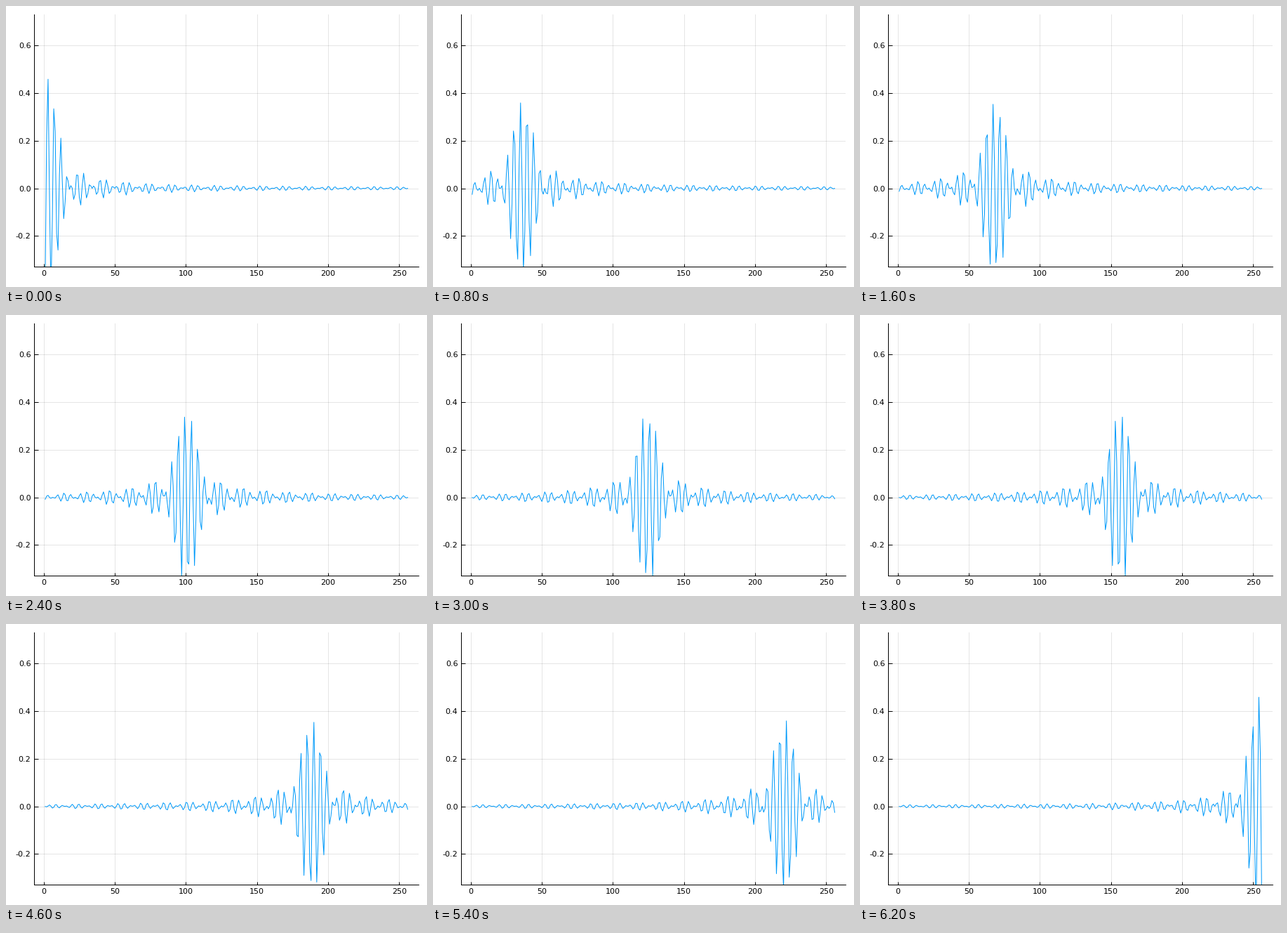
Recreate the animation shown at these times as a matplotlib script. Size 600 by 400 pixels, loop 6.4 s.

```python
import numpy as np
import matplotlib.pyplot as plt
from matplotlib.animation import FuncAnimation

W, H, DPI = 600, 400, 100
PX = 72 / DPI  # one pixel in points
N, BAND, FIRST = 256, 32, 96
STEP_MS = 200

plt.rcParams["font.family"] = "DejaVu Sans"


def polar(matrix):
    """Nearest orthogonal matrix."""
    u, _, vt = np.linalg.svd(matrix)
    return u @ vt


def wave_packets():
    """Varimax rotation of one band of DCT-II vectors: one packet per column."""
    k = FIRST + np.arange(BAND)
    basis = np.sqrt(2 / N) * np.cos(np.pi * np.outer(np.arange(N) + 0.5, k) / N)

    # Start from packets centred every N / BAND samples
    half = np.arange(BAND) + 0.5
    phase = np.pi * np.outer(half, half) / BAND
    rotation = polar(np.cos(phase) + np.sin(phase))
    for _ in range(300):
        packets = basis @ rotation
        rotation = polar(basis.T @ (N * packets**3 - packets))

    packets = basis @ rotation
    flip = packets.max(axis=0) < -packets.min(axis=0)
    return np.where(flip, -packets, packets)


packets = wave_packets()
x = np.arange(1, N + 1)

fig = plt.figure(figsize=(W / DPI, H / DPI), dpi=DPI, facecolor="white")
left, right, top, bottom = 40.4, 588, 12, 371.4
ax = fig.add_axes([left / W, 1 - bottom / H, (right - left) / W, (bottom - top) / H])
margin = 0.03 * (N - 1)
ax.set_xlim(1 - margin, N + margin)
ax.set_ylim(-0.33, 0.73)

x_ticks = np.arange(0, 251, 50)
y_ticks = [-0.2, 0.0, 0.2, 0.4, 0.6]
ax.set_xticks(x_ticks, [str(t) for t in x_ticks])
ax.set_yticks(y_ticks, [f"{t:.1f}" for t in y_ticks])
ax.tick_params(direction="in", width=PX, labelsize=8)
ax.tick_params(axis="x", length=4 * PX, pad=4.6 * PX)
ax.tick_params(axis="y", length=6 * PX, pad=5 * PX)
ax.grid(color="black", alpha=0.1, linewidth=PX)
ax.set_axisbelow(True)
ax.spines[["top", "right"]].set_visible(False)
ax.spines[["left", "bottom"]].set_linewidth(PX)

line, = ax.plot(x, packets[:, 0], color="#009AFA", linewidth=PX)


def draw(frame):
    line.set_ydata(packets[:, frame])
    return line,


anim = FuncAnimation(fig, draw, frames=BAND, interval=STEP_MS,
                     repeat=True, repeat_delay=0)
plt.show()
```
